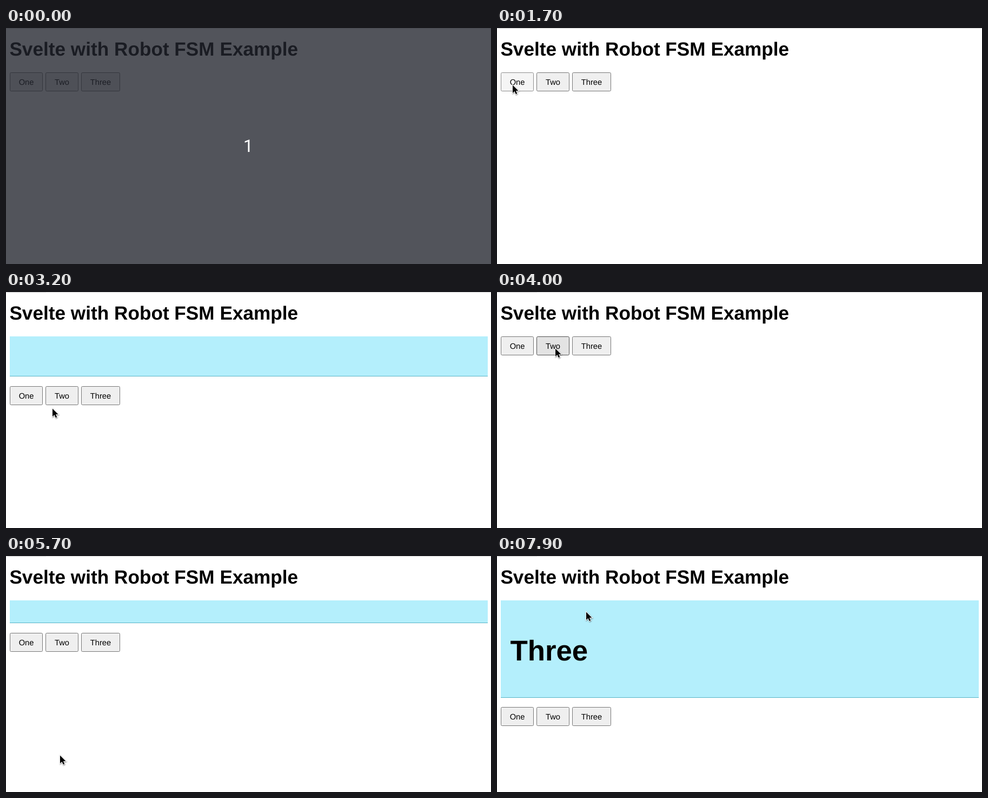
Recreate the animation shown at these times as an HTML page with a canvas. Size 897 px wide and 436 px high, loop 8000 ms.

```html
<!DOCTYPE html>
<html lang="en">
<head>
<meta charset="utf-8">
<title>Svelte with Robot FSM Example</title>
<style>
html, body { margin: 0; width: 100%; height: 100%; overflow: hidden; background: #fff; }
canvas { display: block; }
</style>
</head>
<body>
<canvas id="stage" width="897" height="436"></canvas>
<script>
const ctx = document.getElementById('stage').getContext('2d');
ctx.textRendering = 'geometricPrecision';
const LOOP = 8000, STEP = 100, SLIDE = 400;
const COUNTDOWN_END = 300, POINTER_START = 600;
const PANEL = { x: 7, y: 82, width: 884, height: 256, gap: 17.6 };
const SANS = '"Liberation Sans", Arial, sans-serif';

// When each panel starts to slide open and shut
const panels = [
  { label: 'One', width: 61, open: 1765, close: 3065 },
  { label: 'Two', width: 61, open: 4265, close: 5519 },
  { label: 'Three', width: 72, open: 7767, close: Infinity }
];

// Pointer moves: start, end, x, y. It rests in between.
const pointerHome = [97, 17];
const moves = [
  [600, 700, 7, 100],
  [800, 900, 24, 114],
  [1000, 1400, 28, 104],
  [1800, 2200, 28, 380],
  [2300, 2500, 28, 449],
  [2600, 2900, 50, 294],
  [3100, 3500, 130, 110],
  [3700, 3900, 107, 103],
  [4600, 5000, 107, 329],
  [5000, 5300, 55, 295],
  [5500, 5700, 99, 367],
  [6100, 6800, 164, 102]
];

const looks = {
  rest: ['#efefef', '#767676'],
  hover: ['#e3e3e3', '#4f4f4f'],
  press: ['#f5f5f5', '#8d8d8d']
};

const clamp = v => Math.min(1, Math.max(0, v));
const easeOut = (v, power) => 1 - (1 - clamp(v)) ** power;

function pointerAt(t) {
  let [x, y] = pointerHome;
  for (const [start, end, toX, toY] of moves) {
    const k = easeOut((t - start) / (end - start), 2);
    x += (toX - x) * k;
    y += (toY - y) * k;
  }
  return [Math.round(x), Math.round(y)];
}

function layoutAt(t) {
  const panel = panels.find(p => t >= p.open && t < p.close + SLIDE);
  const shown = panel
    ? easeOut((t - panel.open) / SLIDE, 3) - easeOut((t - panel.close) / SLIDE, 3)
    : 0;
  const height = PANEL.height * shown;
  const rowY = Math.round(PANEL.y + (panel ? height + PANEL.gap : 0));
  let x = PANEL.x;
  const buttons = panels.map(({ label, width }) => {
    const button = { label, x, y: rowY, width, height: 35 };
    x += width + 5;
    return button;
  });
  const close = { label: 'Close', x: 24, y: 285, width: 55, height: 23 };
  return { panel, height: Math.round(height), buttons, close };
}

function isPressed(label, t) {
  return panels.some(p => {
    const start = label === 'Close' ? p.close : label === p.label ? p.open : Infinity;
    return t > start - STEP && t < start;
  });
}

function lookOf(button, t) {
  if (isPressed(button.label, t)) return looks.press;
  // Hover trails the pointer by one step
  const [x, y] = pointerAt(t - STEP);
  const inside = t > POINTER_START &&
    x > button.x && x < button.x + button.width &&
    y > button.y && y < button.y + button.height;
  return inside ? looks.hover : looks.rest;
}

function text(string, x, y, font, align = 'left', color = '#000') {
  ctx.font = font;
  ctx.textAlign = align;
  ctx.fillStyle = color;
  ctx.fillText(string, x, y);
}

function drawButton(button, t) {
  const { label, x, y, width, height } = button;
  const [fill, border] = lookOf(button, t);
  ctx.beginPath();
  ctx.roundRect(x + 0.5, y + 0.5, width - 1, height - 1, 2);
  ctx.fillStyle = fill;
  ctx.fill();
  ctx.lineWidth = 1;
  ctx.strokeStyle = border;
  ctx.stroke();
  text(label, x + width / 2, y + Math.floor(height / 2) + 6, `14.667px ${SANS}`, 'center');
}

function drawPanel({ panel, height, close }, t) {
  const { x, y, width } = PANEL;
  ctx.save();
  ctx.beginPath();
  ctx.rect(x, y, width, height);
  ctx.clip();
  ctx.fillStyle = '#b4effc';
  ctx.fillRect(x, y, width, height);
  text(panel.label, 24.4, 193, `bold 52.8px ${SANS}`);
  drawButton(close, t);
  ctx.fillStyle = '#58b4c6';
  ctx.fillRect(x, y + height - 1, width, 1);
  ctx.restore();
}

function drawPointer(x, y) {
  const arrow = new Path2D('M1 1.5V16L4.5 12.9 6.9 18.3 9.2 17.3 7 12H11.5Z');
  ctx.save();
  ctx.translate(x, y);
  ctx.lineWidth = 1.8;
  ctx.strokeStyle = '#fff';
  ctx.shadowColor = 'rgba(0,0,0,.5)';
  ctx.shadowBlur = 2;
  ctx.shadowOffsetX = 0.5;
  ctx.shadowOffsetY = 1;
  ctx.stroke(arrow);
  ctx.shadowColor = 'transparent';
  ctx.fillStyle = '#000';
  ctx.fill(arrow);
  ctx.restore();
}

function drawTopEdge() {
  ctx.fillStyle = '#dedede';
  ctx.fillRect(0, 0, 897, 1);
  ctx.fillStyle = '#f3f3f3';
  ctx.fillRect(0, 1, 897, 1);
  ctx.fillStyle = '#d0d0d0';
  ctx.fillRect(4, 0, 70, 1);
}

function drawCountdown() {
  ctx.fillStyle = 'rgba(34,37,45,.78)';
  ctx.fillRect(0, 0, 897, 436);
  text('1', 448, 229, '32px Roboto, sans-serif', 'center', '#fff');
}

function draw(t) {
  ctx.fillStyle = '#fff';
  ctx.fillRect(0, 0, 897, 436);
  drawTopEdge();
  text('Svelte with Robot FSM Example', 6.4, 51, `bold 35.2px ${SANS}`);

  const layout = layoutAt(t);
  if (layout.panel) drawPanel(layout, t);
  layout.buttons.forEach(button => drawButton(button, t));

  if (t >= POINTER_START) drawPointer(...pointerAt(t));
  if (t < COUNTDOWN_END) drawCountdown();
}

function frame() {
  draw(Math.floor(performance.now() % LOOP / STEP) * STEP);
  requestAnimationFrame(frame);
}
frame();
</script>
</body>
</html>
```
